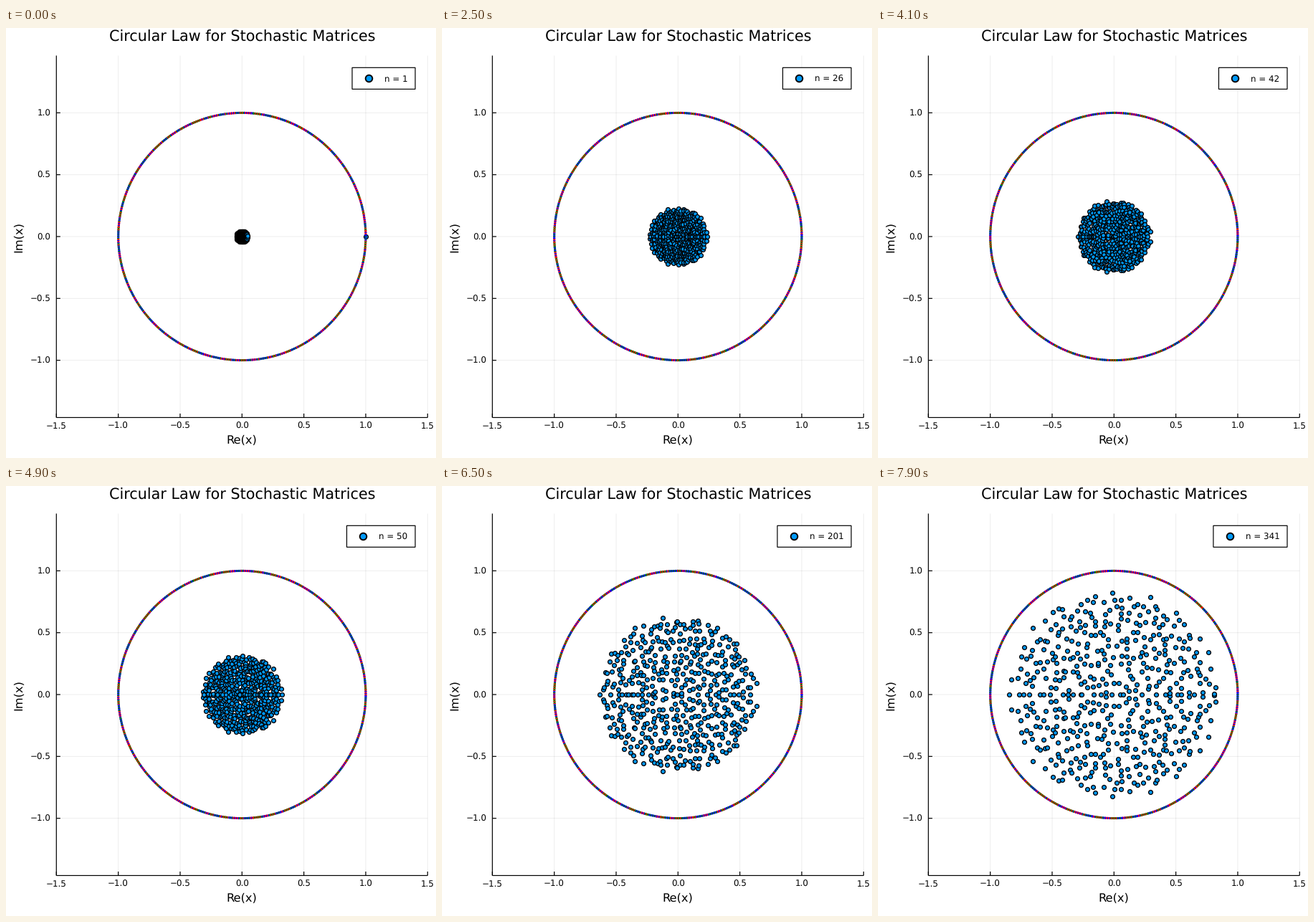
Write a matplotlib script that moves like this. It is 600 by 600 pixels and loops after 8000 ms.

```python
import numpy as np
import matplotlib
import matplotlib.pyplot as plt
from matplotlib.animation import FuncAnimation
from matplotlib.collections import LineCollection
from matplotlib.patches import Rectangle

matplotlib.rcParams["font.family"] = "DejaVu Sans"
matplotlib.rcParams["text.hinting"] = "none"
matplotlib.rcParams["path.snap"] = False

PX = 0.72                       # points per pixel at 100 dpi
FRAMES = 80
SIZE = 500                      # matrix order
CX, CY, UNIT = 329.3, 291.0, 172.65
LEFT, RIGHT, TOP, BOTTOM = 70.3, 588.3, 38.5, 543.5
BLUE = "#009afa"
SMALL, MEDIUM, LARGE = 11.86, 16.3, 20.75

fig = plt.figure(figsize=(6, 6), dpi=100, facecolor="white")
ax = fig.add_axes([0, 0, 1, 1])
ax.set_xlim(0, 600)
ax.set_ylim(600, 0)
ax.axis("off")


def line(xs, ys, **kw):
    return ax.plot(xs, ys, solid_capstyle="butt", **kw)[0]


def label(x, y, s, size, ha="center", **kw):
    return ax.text(x, y, s, fontsize=size * PX, ha=ha, va="baseline", **kw)


def spectrum(seed):
    """Eigenvalues of a random stochastic matrix, without the leading 1."""
    m = np.random.default_rng(seed).exponential(size=(SIZE, SIZE))
    m /= m.sum(axis=1, keepdims=True)
    return np.sort(np.linalg.eigvals(m))[:-1]


def arcs(start, stop):
    ang = np.stack([start, stop], axis=1)
    return np.stack([CX + UNIT * np.cos(ang), CY - UNIT * np.sin(ang)], axis=2)


# Grid, axes and labels
grid = dict(color="black", alpha=0.07, lw=PX, zorder=1)
axis = dict(color="black", lw=1.2 * PX, zorder=2)
for v in np.arange(-1.5, 1.6, 0.5):
    text = f"{v:.1f}".replace("-", "\u2212")
    x, y = CX + v * UNIT, CY - v * UNIT
    line([x, x], [TOP, BOTTOM], **grid)
    line([x, x], [BOTTOM, BOTTOM - 5.5], **axis)
    label(x, 558.7, text, SMALL)
    if abs(v) < 1.2:
        line([LEFT, RIGHT], [y, y], **grid)
        line([LEFT, LEFT + 5.5], [y, y], **axis)
        label(62.5, y + 4.4, text, SMALL, ha="right")
line([LEFT, LEFT], [TOP, BOTTOM], **axis)
line([LEFT, RIGHT], [BOTTOM, BOTTOM], **axis)
label(CX, 19, "Circular Law for Stochastic Matrices", LARGE)
label(CX, 580, "Re(x)", MEDIUM)
label(22, CY + 0.5, "Im(x)", MEDIUM, rotation=90, rotation_mode="anchor")

# Moving parts
dots = line([], [], ls="none", marker="o", ms=5.8 * PX, mfc=BLUE,
            mec="black", mew=1.35 * PX, zorder=3)
ring = LineCollection([], linewidths=3 * PX, zorder=4, capstyle="butt")
ax.add_collection(ring, autolim=False)
box = ax.add_patch(Rectangle((483, 55.3), 88, 30, fc="white", ec="black",
                             lw=1.2 * PX, zorder=5))
key = line([], [], marker="o", ms=9.6 * PX, mfc=BLUE, mec="black",
           mew=1.9 * PX, zorder=6)
key_text = label(528, 75, "", SMALL, ha="left", zorder=6)

spectra = [spectrum(seed) for seed in range(6)]
PATCHES, SPECKS = 150, 360
COLORS = np.array(["red", "green", "blue"])


def draw_ring(rng):
    """Uneven arcs of cycling colour, speckled with the next colour."""
    cuts = np.arange(PATCHES + 1) + rng.uniform(-0.4, 0.4, PATCHES + 1)
    cuts[-1] = cuts[0] + PATCHES
    cuts *= 2 * np.pi / PATCHES
    step = 2 * np.pi / SPECKS
    spots = cuts[0] + step * np.arange(SPECKS)
    patch = np.searchsorted(cuts, spots, side="right") - 1
    ring.set_segments(np.concatenate([arcs(cuts[:-1], cuts[1:] + 0.002),
                                      arcs(spots, spots + 0.45 * step)]))
    ring.set_color(COLORS[np.append(np.arange(PATCHES), patch + 2) % 3])


def draw(i):
    n = i + 1 if i <= 50 else 51 + 10 * (i - 50)

    bulk = spectra[i % 6]
    if i // 6 % 2:
        bulk = np.sort(-bulk)
    pts = np.sqrt(n) * np.append(bulk, 1)
    pts = pts[pts.real < 1.5]
    dots.set_data(CX + UNIT * pts.real, CY - UNIT * pts.imag)

    draw_ring(np.random.default_rng(100 + i))

    left = 483 - 7.54 * (len(str(n)) - 1)
    box.set_x(left)
    box.set_width(571 - left)
    key.set_data([left + 23], [70.4])
    key_text.set_x(left + 45)
    key_text.set_text(f"n = {n}")
    return dots, ring, box, key, key_text


anim = FuncAnimation(fig, draw, frames=FRAMES, interval=100,
                     repeat=True, repeat_delay=0, blit=False)
plt.show()
```
